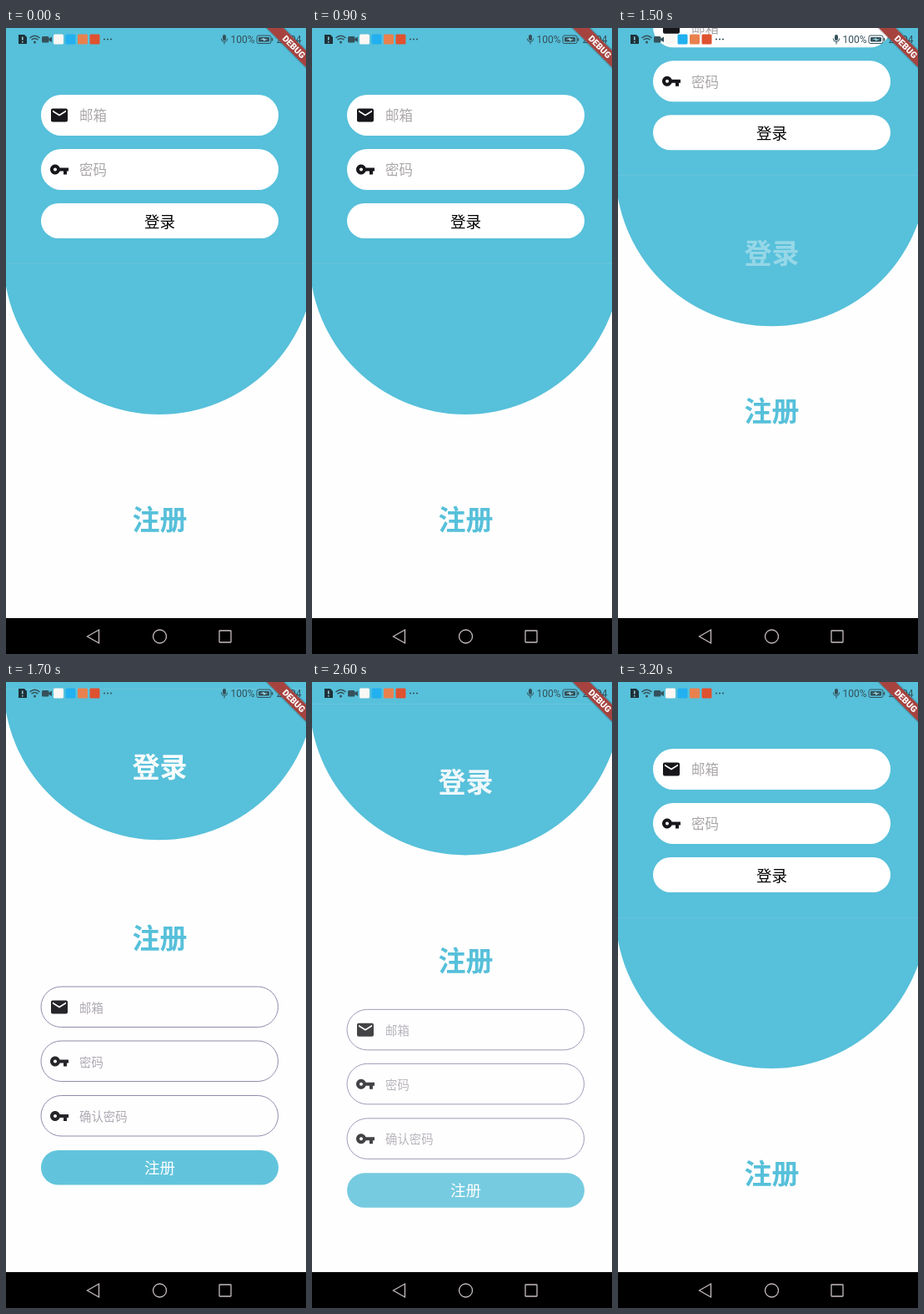
These frames come from a looping animation (360 by 750 pixels, 3.3 s). An HTML page:

```html
<!DOCTYPE html>
<html lang="zh-CN">
<head>
<meta charset="utf-8">
<style>
  html, body { margin: 0; width: 100%; height: 100%; overflow: hidden; background: #fefefe; }
  svg { display: block; width: 360px; height: 750px; }
  text { font-family: "Noto Sans CJK SC", "Noto Sans CJK", "Noto Sans", sans-serif; }
  .blue { fill: #57c0da; }
  .white { fill: #fff; }
  .icon { fill: #17161a; }
  .hint { font-size: 16.5px; fill: #a9a5a6; }
  .small .hint { font-size: 14.4px; fill: #a8a3ad; }
  .label { font-size: 18.5px; font-weight: 500; text-anchor: middle; }
  .title { font-size: 33px; font-weight: 700; text-anchor: middle; }
  .field { fill: #fff; stroke: #8983a6; }
  .status text { font: 12px Roboto, sans-serif; }
  .debug { font: 900 10.5px Roboto, sans-serif; fill: #fff; text-anchor: middle; }
  .nav { fill: none; stroke: #c6bdbd; stroke-width: 1.3; }
</style>
</head>
<body>
<svg viewBox="0 0 360 750">
  <defs>
    <path id="mail" d="M20 4H4c-1.1 0-2 .9-2 2v12c0 1.1.9 2 2 2h16c1.1 0 2-.9 2-2V6c0-1.1-.9-2-2-2zm0 4l-8 5-8-5V6l8 5 8-5z"/>
    <path id="key" d="M12.65 10C11.83 7.67 9.61 6 7 6c-3.31 0-6 2.69-6 6s2.69 6 6 6c2.61 0 4.83-1.67 5.65-4H17v4h4v-4h2v-4zM7 14c-1.1 0-2-.9-2-2s.9-2 2-2 2 .9 2 2-.9 2-2 2z"/>
  </defs>
  <rect width="360" height="750" fill="#fefefe"/>

  <g id="login">
    <path class="blue" d="M-3-20V276A187 187 0 0 0 371 276V-20z"/>
    <path d="M0 282H360" stroke="#fff" stroke-opacity=".1"/>
    <rect class="white" x="42" y="80" width="285" height="49" rx="24.5"/>
    <rect class="white" x="42" y="145" width="285" height="49" rx="24.5"/>
    <rect class="white" x="42" y="210" width="285" height="42" rx="21"/>
    <use class="icon" href="#mail" x="52" y="92.5"/>
    <use class="icon" href="#key" x="52" y="157.5"/>
    <text class="hint" x="88" y="111.3">邮箱</text>
    <text class="hint" x="88" y="176.3">密码</text>
    <text class="label" x="184.5" y="238.5">登录</text>
    <text class="title white" id="loginTitle" x="184.5" y="387.5">登录</text>
  </g>

  <g id="register">
    <text class="title blue" x="184.5" y="318.5">注册</text>
    <g id="form" class="small">
      <rect class="field" x="42" y="365" width="284.5" height="48.5" rx="24.25"/>
      <rect class="field" x="42" y="430" width="284.5" height="48.5" rx="24.25"/>
      <rect class="field" x="42" y="495.5" width="284.5" height="48.5" rx="24.25"/>
      <rect class="blue" x="42" y="561" width="285" height="41.5" rx="20.75"/>
      <use class="icon" href="#mail" x="52" y="377.5"/>
      <use class="icon" href="#key" x="52" y="442.5"/>
      <use class="icon" href="#key" x="52" y="508"/>
      <text class="hint" x="88" y="395.5">邮箱</text>
      <text class="hint" x="88" y="460.5">密码</text>
      <text class="hint" x="88" y="525.8">确认密码</text>
      <text class="label white" x="184.5" y="588.7">注册</text>
    </g>
  </g>

  <circle id="touch" r="10" fill="#fff" fill-opacity=".55"/>

  <g class="status" fill="#34515b">
    <path fill="#1d3138" d="M15 8h7l3 3v8H15z"/>
    <path d="M19.8 10.5v4M19.8 16v1.5" stroke="#a8dbe8" stroke-width="1.4"/>
    <path d="M28.5 12q6-5.5 12 0M30.5 14.3q4-3.6 8 0" fill="none" stroke="#34515b" stroke-width="1.4"/>
    <circle cx="34.5" cy="17" r="1.5"/>
    <rect x="43" y="10" width="8.5" height="7.5" rx="1.5"/>
    <path d="M51 13l4-2.5v6.5l-4-2.5z"/>
    <rect x="57" y="7.5" width="12" height="12" rx="1.5" fill="#fbf7f4"/>
    <rect x="71.500" y="7.5" width="12" height="12" rx="1.5" fill="#22b0f0"/>
    <rect x="86" y="7.5" width="12" height="12" rx="1.5" fill="#e9814f"/>
    <rect x="100.5" y="7.5" width="12" height="12" rx="1.5" fill="#df5230"/>
    <path d="M117 13.5h2m2 0h2m2 0h2" stroke="#34515b" stroke-width="1.7"/>
    <rect x="260" y="8" width="4" height="7" rx="2"/>
    <path d="M258.300 12.500q0 4 3.700 4t3.700-4M262 16.500v3" fill="none" stroke="#34515b"/>
    <text x="269.5" y="18">100%</text>
    <rect x="301" y="9" width="17" height="9.500" rx="2" fill="none" stroke="#34515b"/>
    <rect x="303" y="11" width="13" height="5.5" rx="1"/>
    <path d="M319.500 12v3.500" stroke="#34515b" stroke-width="1.500"/>
    <path d="M305 14l5-2.200v1.500h4l-5 2.400v-1.700z" fill="#9dd5e3"/>
    <text x="324.5" y="18">21:04</text>
  </g>

  <path d="M311 0H335L360 25V49z" fill="#000" fill-opacity=".16"/>
  <path d="M313 0H333L360 27V47z" fill="#a6433f"/>
  <text class="debug" transform="translate(345.500 22.500) rotate(45)" y="3.700">DEBUG</text>

  <rect y="707" width="360" height="43"/>
  <g class="nav">
    <path d="M97.500 729L111.500 721V737z"/>
    <circle cx="184.500" cy="729" r="8"/>
    <rect x="256" y="722" width="14" height="14" rx=".5"/>
  </g>
</svg>
<script>
const LOOP = 3300, STEP = 100;
const el = id => document.getElementById(id);
const [login, register, form, loginTitle, touch] =
  ["login", "register", "form", "loginTitle", "touch"].map(el);

const ease = (t, start, length) => {
  const p = Math.min(1, Math.max(0, (t - start) / length));
  return (1 - Math.cos(Math.PI * p)) / 2;
};
const shift = (node, y) => node.setAttribute("transform", `translate(0 ${y})`);

function draw(t) {
  // 0 = login page, 1 = register page
  const back = ease(t, 2500, 496);
  const page = ease(t, 1320, 430) - back;
  const lower = ease(t, 1320, 380) - back;

  shift(login, -283 * page);
  shift(register, 282 * (1 - lower));
  loginTitle.setAttribute("opacity", page);
  form.setAttribute("opacity", Math.max(0, 2 * page - 1));

  const first = t >= 1200 && t < 1400, second = t >= 2200 && t < 2400;
  touch.setAttribute("visibility", first || second ? "visible" : "hidden");
  touch.setAttribute("cx", first ? 194 : 199);
  touch.setAttribute("cy", first ? 589 : 96);
}

const begin = performance.now();
function tick() {
  const t = (performance.now() - begin) % LOOP;
  draw(Math.floor(t / STEP) * STEP);
  requestAnimationFrame(tick);
}
tick();
</script>
</body>
</html>
```
